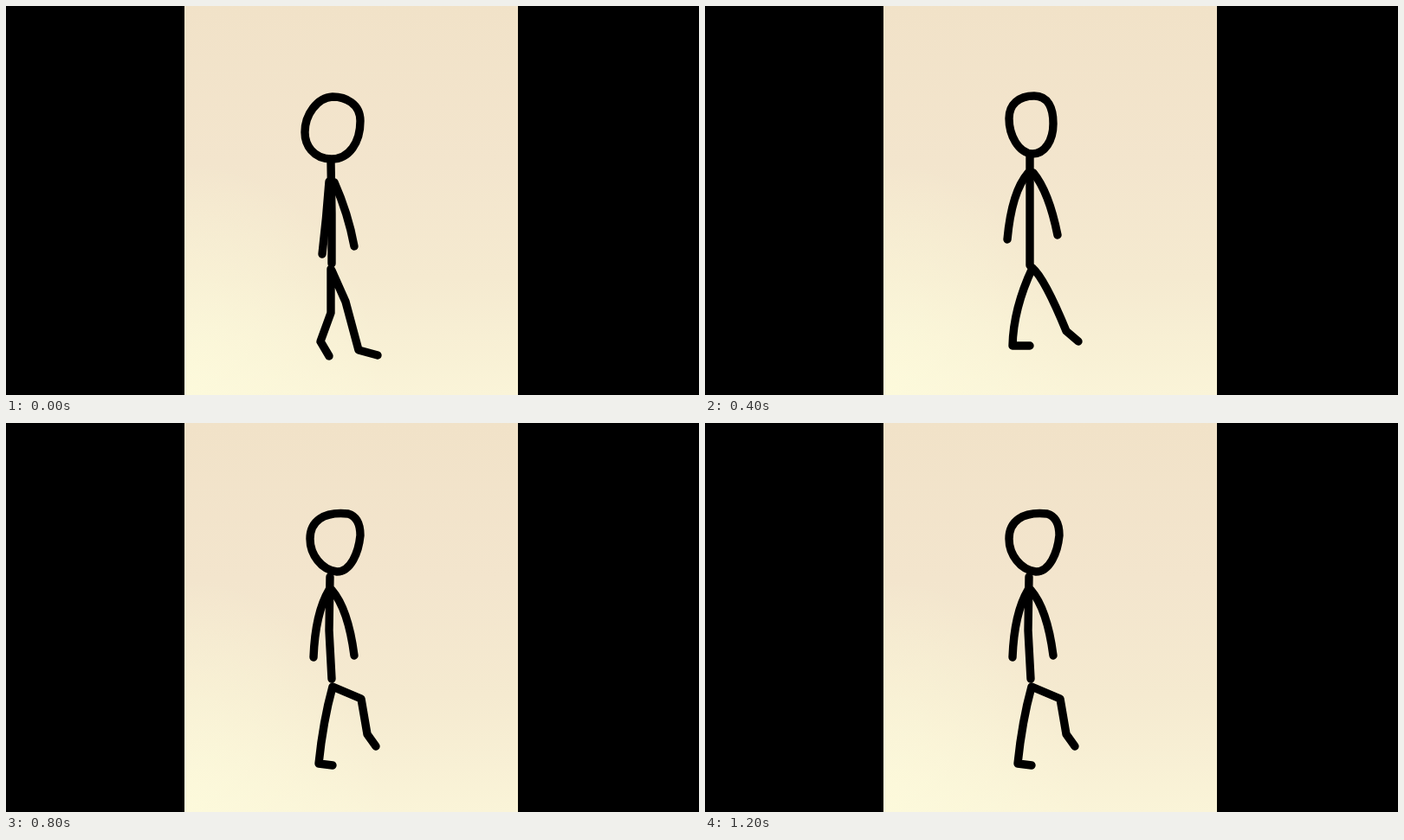
Write an HTML page that moves like this. It is 800 px wide and 450 px high and loops after 1300 ms.

```html
<!DOCTYPE html>
<html lang="en">
<head>
<meta charset="utf-8">
<title>Walking stick figure</title>
<style>
  html, body { margin: 0; width: 100%; height: 100%; overflow: hidden; background: #000; }
  svg { display: block; width: 800px; height: 450px; overflow: hidden; }
  #strip {
    fill: none; stroke: #000; stroke-width: 9.4;
    stroke-linecap: round; stroke-linejoin: round;
    animation: walk 1300ms steps(13) infinite;
  }
  /* 13 poses, one stage width apart */
  @keyframes walk { to { transform: translateX(-10400px); } }
</style>
</head>
<body>
<svg viewBox="0 0 800 450">
  <defs>
    <linearGradient id="paper" x1="0" y1="0" x2="0" y2="1">
      <stop offset="0" stop-color="#f1e2c8"/>
      <stop offset=".4" stop-color="#f3e5cd"/>
      <stop offset=".7" stop-color="#f5ead0"/>
      <stop offset="1" stop-color="#faf4d8"/>
    </linearGradient>
    <radialGradient id="glow" cx="0" cy="1" r=".6">
      <stop offset="0" stop-color="#fdfbdc" stop-opacity=".8"/>
      <stop offset="1" stop-color="#fdfbdc" stop-opacity="0"/>
    </radialGradient>

    <!-- each pose: head, torso, arms, legs -->
    <g id="down">
      <path d="M377 105C392 105 409 113 409 133C409 158 396 177 376 177C354 177 345 160 345 146C345 126 359 106 377 105Z"/>
      <path d="M375 180L376 240V298"/>
      <path d="M373 203Q370 245 365 287M379 204Q395 240 402 278"/>
      <path d="M375 304V355L363 388L373 405M376 306L392 342L407 398L429 404"/>
    </g>
    <g id="lift">
      <path d="M380 103C396 103 409 112 409 131C409 156 396 176 376 177C354 177 345 160 345 144C345 124 360 104 380 103Z"/>
      <path d="M375 178L376 240L375 300"/>
      <path d="M374 200Q371 240 367 283M378 200Q390 238 394 279"/>
      <path d="M376 306L392 338L366 372L363 387M376 306L385 350L395 401L413 403"/>
    </g>
    <g id="pass">
      <path d="M384 100C398 100 406 108 406 124C406 150 398 174 376 176C358 174 349 158 349 140C349 122 362 101 384 100Z"/>
      <path d="M375 174L376 240L373 280L376 330L382 393Q383 401 389 401H397"/>
      <path d="M375 195L369 278M377 195L384 240L385 278"/>
      <path d="M377 308L410 322L372 362L371 378"/>
    </g>
    <g id="up">
      <path d="M393 104L390 100C403 100 411 112 411 128C411 150 400 176 379 176C362 174 350 156 350 136C350 116 364 101 390 100"/>
      <path d="M375 178L374 240V300L375 398L392 399"/>
      <path d="M374 195Q364 240 362 276M378 195Q388 225 392 273"/>
      <path d="M376 305L416 321L383 370L387 383"/>
    </g>
    <g id="reach">
      <path d="M395 105C405 108 409 118 409 130C407 150 398 172 382 172C364 170 351 152 351 134C351 114 366 102 395 105Z"/>
      <path d="M374 178L373 240L376 296"/>
      <path d="M373 193Q357 220 355 271M376 193Q395 215 402 269"/>
      <path d="M377 305Q366 345 361 394L377 396M377 305L410 319L417 360L427 374"/>
    </g>
    <g id="step">
      <path d="M380 104C396 104 402 118 402 136C402 156 392 171 378 171C362 170 351 150 351 130C351 114 362 104 380 104Z"/>
      <path d="M375 172V300"/>
      <path d="M373 193Q354 215 349 270M379 193Q397 215 407 265"/>
      <path d="M378 303Q356 350 355 393H375M378 303Q392 315 417 376L431 388"/>
    </g>
  </defs>

  <rect width="800" height="450"/>
  <rect x="206" width="385" height="450" fill="url(#paper)"/>
  <rect x="206" width="385" height="450" fill="url(#glow)"/>

  <g id="strip">
    <use href="#down"/>
    <use href="#lift" x="800"/>
    <use href="#pass" x="1600"/>
    <use href="#reach" x="2400"/>
    <use href="#step" x="3200"/>
    <use href="#down" x="4000"/>
    <use href="#pass" x="4800"/>
    <use href="#up" x="5600"/>
    <use href="#reach" x="6400"/>
    <use href="#step" x="7200"/>
    <use href="#lift" x="8000"/>
    <use href="#pass" x="8800"/>
    <use href="#reach" x="9600"/>
  </g>
</svg>
</body>
</html>
```
